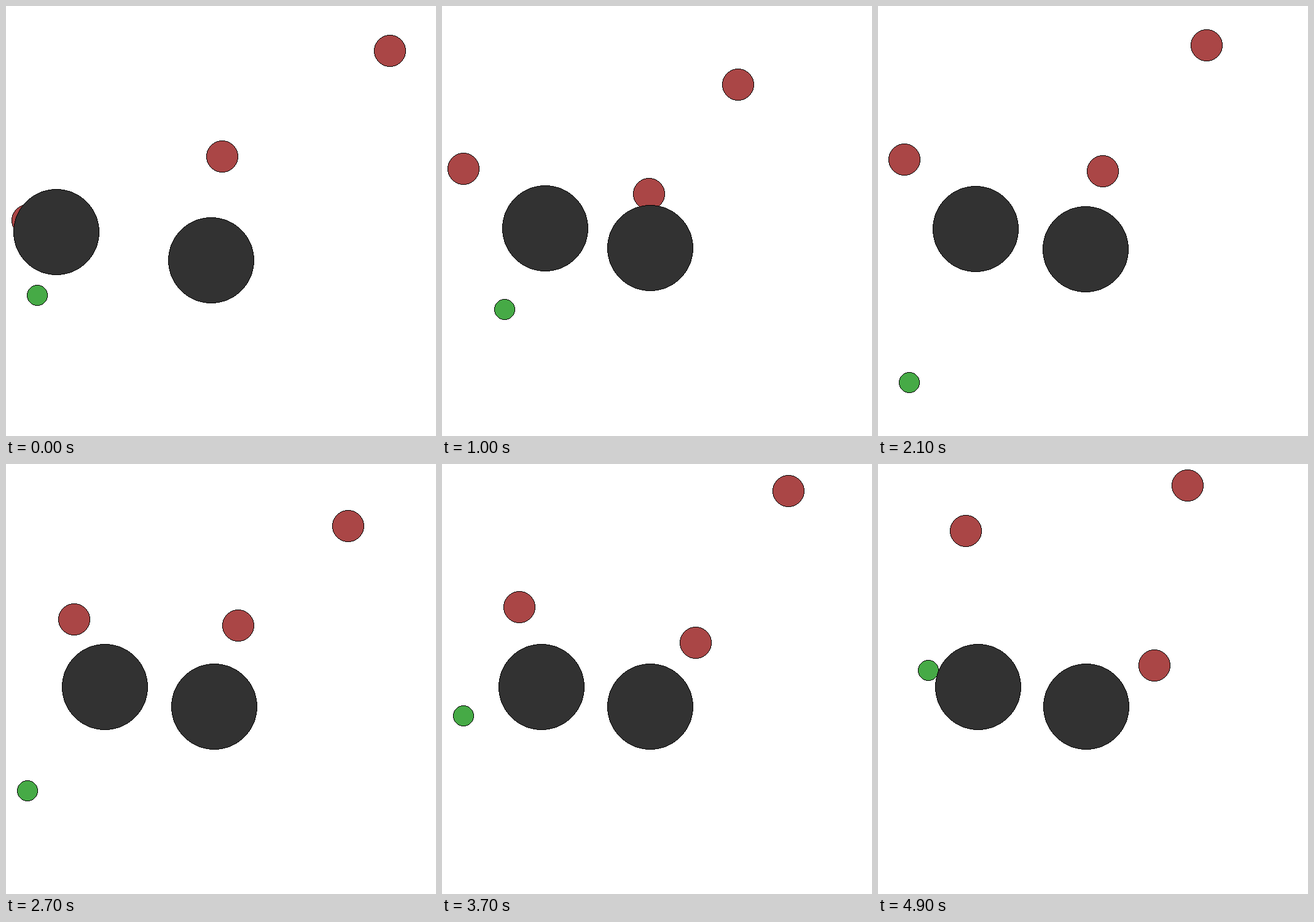
Recreate the animation shown at these times as an HTML page with a canvas. Size 700 by 700 pixels, loop 5 s.

```html
<!DOCTYPE html>
<html lang="en">
<head>
<meta charset="utf-8">
<title>Drifting discs</title>
<style>
  html, body { margin: 0; width: 100%; height: 100%; overflow: hidden; background: #fff; }
  canvas { display: block; width: 700px; height: 700px; }
</style>
</head>
<body>
<canvas id="stage" width="700" height="700"></canvas>
<script>
const SIZE = 700, LOOP = 5000, TICK = 100, WALL = 35;
const ctx = document.getElementById("stage").getContext("2d");

// Every disc turns at the same ticks and glides smoothly in between
const ticks = [0, 6, 14, 20, 27, 33, 42, 49];
const walkers = [
  { r: 25.5, fill: "#aa4646", x: [35, 35, 35, 35, 111, 96, 164, 143],
    y: [349, 288, 250, 250, 253, 258, 189, 109] },
  { r: 25.5, fill: "#aa4646", x: [352, 327, 352, 364, 378, 408, 419, 450],
    y: [245, 323, 277, 270, 263, 304, 275, 328] },
  { r: 25.5, fill: "#aa4646", x: [625, 502, 486, 530, 557, 575, 542, 504],
    y: [73, 161, 80, 60, 101, 50, 44, 35] },
  { r: 16.5, fill: "#46aa46", x: [51, 116, 76, 54, 35, 35, 35, 82],
    y: [471, 423, 578, 619, 532, 459, 358, 336] }
];
const slide = [0, 1, 0.86, 0.89, 0.92, 0.785, 1.115, 0.94];

// Cubic curve through the key values
function glide(keys, t) {
  const last = ticks.length - 1;
  const slope = i => {
    const a = Math.max(i - 1, 0), b = Math.min(i + 1, last);
    return (keys[b] - keys[a]) / (ticks[b] - ticks[a]);
  };
  let i = 0;
  while (i < last - 1 && ticks[i + 1] <= t) i++;
  const span = ticks[i + 1] - ticks[i];
  const p = (t - ticks[i]) / span, q = 1 - p;
  return keys[i] * q * q * (1 + 2 * p) + keys[i + 1] * p * p * (1 + 2 * q)
    + span * p * q * (slope(i) * q - slope(i + 1) * p);
}

// Half the width in whole pixels of a disc's row at distance d from its centre
function halfRow(r, d) {
  if (d > r) return 0;
  const steep = Math.sqrt(r * r - d * d) + 0.5;
  const flat = Math.sqrt(r * r - (d - 0.5) ** 2);
  return Math.round(Math.max(steep, flat));
}

// Hard-edged disc with a one pixel outline
function disc(x, y, r, fill) {
  x = Math.round(x);
  y = Math.round(y);
  const bar = (row, half, colour) => {
    ctx.fillStyle = colour;
    ctx.fillRect(x - half, y + row, 2 * half, 1);
  };
  for (let row = -r - 0.5; row < r; row++) {
    const d = Math.abs(row + 0.5), outer = halfRow(r, d);
    bar(row, outer, "#000");
    bar(row, Math.min(outer - 1, halfRow(r, d + 1)), fill);
  }
}

function draw(now) {
  const t = Math.floor((now % LOOP) / TICK);
  ctx.fillStyle = "#fff";
  ctx.fillRect(0, 0, SIZE, SIZE);
  for (const w of walkers) {
    disc(Math.max(WALL, glide(w.x, t)), Math.max(WALL, glide(w.y, t)), w.r, w.fill);
  }
  const s = glide(slide, t);
  disc(82 + 86 * s, 368.45 - 6.27 * s, 69.5, "#323232");
  disc(334 + 5 * s, 414 - 20.5 * s, 69.5, "#323232");
}

const start = performance.now();
function frame() {
  draw(performance.now() - start);
  requestAnimationFrame(frame);
}
frame();
</script>
</body>
</html>
```
